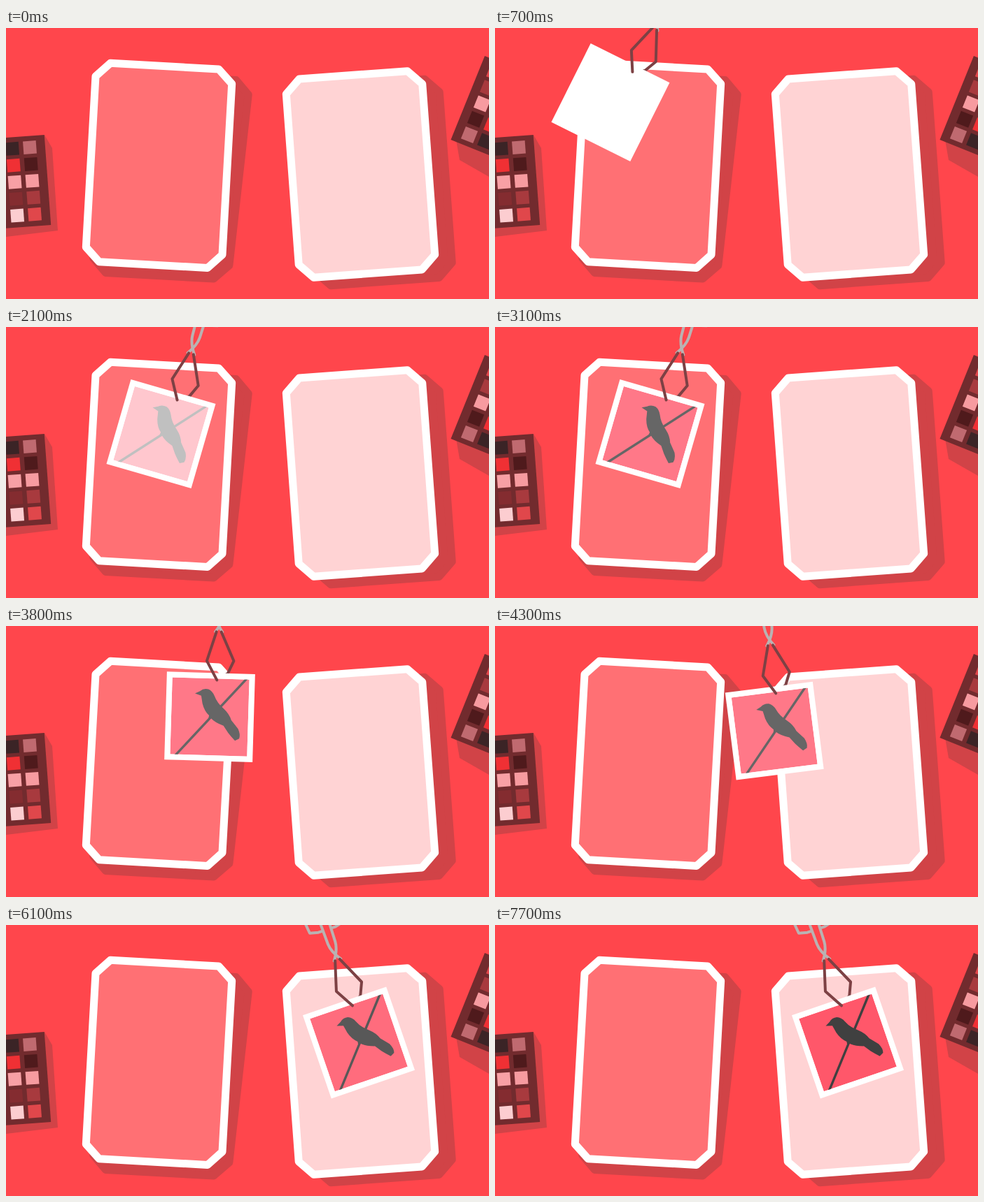
Write an HTML page that moves like this. It is 690 px wide and 388 px high and loops after 8 s.

```html
<!DOCTYPE html>
<html lang="en">
<head>
<meta charset="utf-8">
<title>Darkroom trays</title>
<style>
  html, body { margin: 0; height: 100%; overflow: hidden; background: #ff464c; }
  svg { display: block; width: 100%; height: 100%; }
  .shadow { fill: #d14347; stroke: #d14347; }
  .tray { stroke: #fff; }
  .tray, .shadow { stroke-width: 11; stroke-linejoin: round; }
  .flat { fill: #d14347; }
  .tongs { fill: none; stroke-width: 4; stroke-linecap: round; stroke-linejoin: round; }
  .grip { stroke: #7d4144; }
  .handle { stroke: #bab2b2; }
</style>
</head>
<body>
<svg viewBox="0 0 690 388">
  <defs>
    <g id="palette">
      <path fill="#722b2e" d="M-47-16.4H22V113H-47z"/>
      <g id="swatches"></g>
    </g>
    <path id="octagon" d="M-77.5-142.5h155l20 20v245l-20 20h-155l-20-20v-245z"/>
    <path id="handle" d="M5-122Q-5-136-5.5-148L-6.5-190M-6.5-168H-13L-25-171-27-190"/>
    <clipPath id="window"><path d="M-55-55H55V55H-55z"/></clipPath>
  </defs>

  <path class="flat" d="M55 153L66 172 74 290 0 299V200z"/>
  <use href="#palette" transform="translate(34 171) rotate(-4.2)"/>
  <path class="flat" d="M643 160L648 189 690 213V170z"/>
  <use href="#palette" transform="translate(662 153) rotate(202)"/>

  <use href="#octagon" class="shadow" transform="translate(235.5 212.5) skewX(-3.2) rotate(3.2)"/>
  <use href="#octagon" class="tray" fill="#ff7074" transform="translate(218.5 196.9) rotate(3.2)"/>
  <use href="#octagon" class="shadow" transform="translate(531 221) rotate(-4.2)"/>
  <use href="#octagon" class="tray" fill="#ffd3d4" transform="translate(506.5 209.5) rotate(-4.2)"/>

  <g id="photo">
    <g class="tongs">
      <use href="#handle" class="handle" x="9.5"/>
      <path class="grip" d="M13-122L32-81 24-63 10-53"/>
    </g>
    <path fill="#fff" d="M-63-63H63V63H-63z"/>
    <g clip-path="url(#window)">
      <path id="sky" d="M-55-55H55V55H-55z"/>
      <g id="bird">
        <path stroke="currentColor" stroke-width="3.4" d="M52-57L-48 57"/>
        <path fill="currentColor" d="M-22-33L-15-36.5Q-10-41-3-39.5Q3-37 6-30Q10-20 20-12Q28-5 31 4Q37 11 41 16Q45 24 43 30L37 33Q31 27 27 22L20 12Q8 8 2 2L-2 4-1-2Q-8-8-11-19L-13-30z"/>
      </g>
    </g>
    <g class="tongs">
      <use href="#handle" class="handle" transform="translate(9.5) scale(-1 1)"/>
      <path class="grip" d="M6-122L-6.5-80 8.7-53"/>
    </g>
  </g>
</svg>
<script>
const LOOP = 8000;
const $ = id => document.getElementById(id);

const columns = [
  '#c06a70 #4f1a1c #f79ba0 #a83a3e #e0474b',
  '#3b2426 #f03034 #f8a0a5 #842c30 #fccdd0',
];
$('swatches').innerHTML = columns.map((colors, col) => colors.split(' ').map((color, row) =>
  `<rect x="${-9.3 - col * 25}" y="${row * 24 - 9.3}" width="18.6" height="18.6" fill="${color}"/>`
).join('')).join('');

// Poses are x, y and angle; the carry from tray to tray is a Bezier curve
const carry = [[221.5, 153, 16.1], [373, 85, -20], [372, 176, 4.4], [504, 168.5, -18.9]];
const entry = [-296, -244, 54.5];

const ramp = (t, start, end) => Math.min(1, Math.max(0, (t - start) / (end - start)));

function bezier(a, b, c, d, u) {
  const v = 1 - u;
  return a * v ** 3 + 3 * b * v * v * u + 3 * c * v * u * u + d * u ** 3;
}

function draw(t) {
  const away = (1 - ramp(t, 300, 900)) ** 1.5;
  const moved = ramp(t, 3600, 4700);
  const [x, y, angle] = entry.map((offset, k) =>
    offset * away + bezier(...carry.map(pose => pose[k]), moved));
  $('photo').setAttribute('transform', `translate(${x} ${y}) rotate(${angle})`);

  // The picture darkens in each bath
  const depth = 153 * ramp(t, 1400, 3100) + 38 * ramp(t, 5600, 7000);
  const gray = 255 - depth;
  $('sky').style.fill = `rgb(255,${255 - 0.88 * depth},${255 - 0.78 * depth})`;
  $('bird').style.color = `rgb(${gray},${gray},${gray})`;
}

function frame() {
  draw(performance.now() % LOOP);
  requestAnimationFrame(frame);
}
frame();
</script>
</body>
</html>
```
